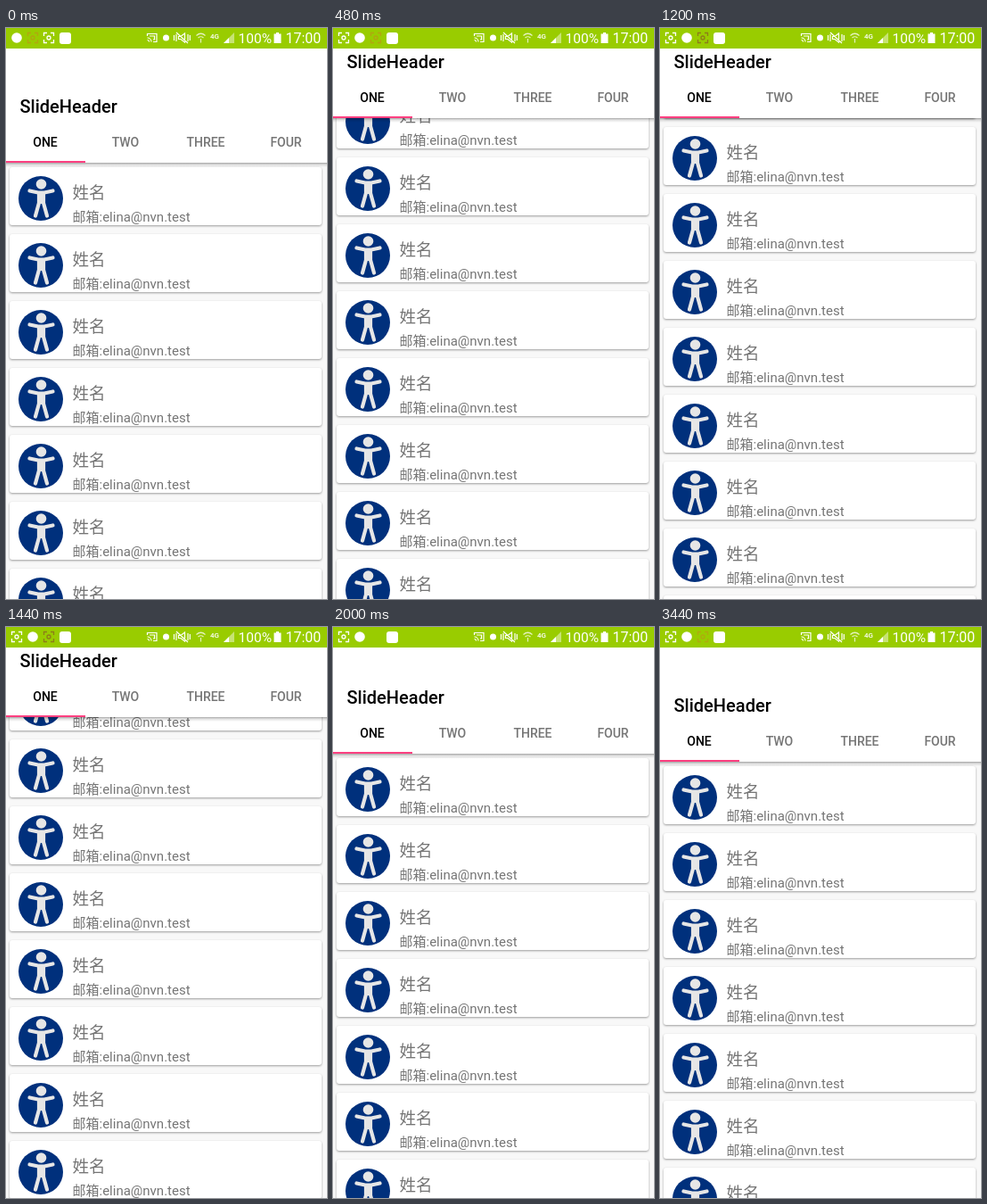
These frames come from a looping animation (360x640 px, 3.52 s). An HTML page:

```html
<!DOCTYPE html>
<html lang="zh-CN">
<head>
<meta charset="utf-8">
<title>Collapsing header</title>
<style>
  html, body { margin: 0; width: 100%; height: 100%; overflow: hidden; background: #f8f8f8; }
  svg { display: block; font-family: Roboto, "Noto Sans CJK SC", "Noto Sans CJK", sans-serif; }
  .card { filter: drop-shadow(0 1px 1px rgba(0, 0, 0, .38)); }
  .grey { fill: #757575; }
  .tabs { font-size: 14px; font-weight: 500; text-anchor: middle; }
  .line { fill: none; stroke: #fff; stroke-width: 1.2; }
  .limbs { fill: none; stroke: #e6e6e6; stroke-width: 4.2; stroke-linecap: round; stroke-linejoin: round; }
</style>
</head>
<body>
<svg width="360" height="640" viewBox="0 0 360 640">
  <defs>
    <linearGradient id="shade" x2="0" y2="1">
      <stop stop-color="#000" stop-opacity=".34"/>
      <stop offset=".4" stop-color="#000" stop-opacity=".12"/>
      <stop offset="1" stop-color="#000" stop-opacity="0"/>
    </linearGradient>
    <g id="card">
      <rect class="card" x="4" y="156" width="350" height="65" rx="3" fill="#fff"/>
      <circle cx="39" cy="191" r="25" fill="#00307c"/>
      <circle cx="39.500" cy="175" r="5.800" fill="#e6e6e6"/>
      <path class="limbs" d="M26.500 182.500 36 184.500H43L52.500 182.500M37 185V196L33 210.500M42 185V196L46 210.500M39.500 185V195"/>
      <g class="grey">
        <text x="74.5" y="190.5" font-size="18.5">姓名</text>
        <text x="74.5" y="217" font-size="15">邮箱:elina@nvn.test</text>
      </g>
    </g>
    <g id="capture" fill="none" stroke-width="1.3">
      <path d="M-5.5-2V-5.5H-2M2-5.5H5.5V-2M5.5 2V5.5H2M-2 5.5H-5.5V2"/>
      <circle r="2"/>
    </g>
  </defs>

  <rect width="360" height="640" fill="#f8f8f8"/>
  <g id="list"></g>

  <g id="header">
    <rect y="151" width="360" height="5" fill="url(#shade)"/>
    <rect y="-40" width="360" height="191" fill="#fff"/>
    <text x="15.5" y="94.5" font-size="20" font-weight="500">SlideHeader</text>
    <g class="tabs">
      <text x="44" y="133">ONE</text>
      <g class="grey">
        <text x="134" y="133">TWO</text>
        <text x="224" y="133">THREE</text>
        <text x="314" y="133">FOUR</text>
      </g>
    </g>
    <rect y="149" width="89" height="2" fill="#ff4081"/>
  </g>

  <rect width="360" height="23" fill="#99cc00"/>
  <use id="first" href="#capture" y="11" stroke="#fff"/>
  <circle id="dot" cy="11" r="5.8" fill="#fff"/>
  <use id="ghost" href="#capture" y="11"/>
  <rect x="60" y="5" width="13" height="13" rx="3" fill="#fff"/>

  <g class="line">
    <path d="M158.5 9V6.5H169V15.5H165M158.5 11A4.5 4.5 0 0 1 163 15.5M158.5 13.5A2 2 0 0 1 160.5 15.5M161 9H166.500V13H165"/>
    <path d="M188.5 8V14M191 7V15M204 7V15M206.3 8V14M193.5 9.5H196L200.5 6V16L196 12.5H193.5ZM191 5 204 17"/>
    <path d="M213.5 8.5Q218.5 4 223.5 8.5M215.5 11Q218.5 8.500 221.5 11M218.5 12V16.5" opacity=".75"/>
  </g>
  <circle cx="179.5" cy="11" r="3.5" fill="#fff"/>
  <g fill="#fff">
    <path d="M256 5V17H244Z" opacity=".45"/>
    <path d="M250 11V17H244Z"/>
    <path d="M303 5H306V6.5H308.5V17H300.5V6.5H303Z"/>
    <text x="229" y="11.5" font-size="8" font-weight="500">4G</text>
    <text x="260.5" y="17" font-size="15.500">100%</text>
    <text x="313.5" y="17" font-size="16">17:00</text>
  </g>
</svg>
<script>
const $ = id => document.getElementById(id);
const LOOP = 3520, STEP = 80, PITCH = 75, COLLAPSE = 50;

$('list').innerHTML = Array.from({ length: 9 }, (_, i) => `<use href="#card" y="${i * PITCH}"/>`).join('');

// Scroll distance: [time, position, velocity]
const keys = [
  [0, 0, 0], [480, 86, .02], [800, 87, .02], [1120, 120, 0],
  [1440, 105, -.16], [1760, 44, -.18], [2160, 0, 0]
];

function scrollAt(t) {
  const i = keys.findIndex(k => k[0] > t);
  if (i < 0) return 0;
  const [t0, p0, v0] = keys[i - 1], [t1, p1, v1] = keys[i];
  const d = t1 - t0, u = (t - t0) / d, w = 1 - u;
  return w * w * ((1 + 2 * u) * p0 + u * d * v0) + u * u * ((3 - 2 * u) * p1 - w * d * v1);
}

// Fading notification icon: [start, colour, opacity]
const ghostStates = [[0, '#e06030', .35], [720, '#d04020', .9], [1040, '#8a6a20', .8], [1680, '#fff', 0], [2320, '#e06030', .3]];

function draw(now) {
  const t = Math.floor(now % LOOP / STEP) * STEP;
  const y = Math.round(scrollAt(t));
  $('list').setAttribute('transform', `translate(0 ${-y})`);
  $('header').setAttribute('transform', `translate(0 ${-Math.min(y, COLLAPSE)})`);

  const swapped = t < STEP;
  const [, colour, opacity] = ghostStates.findLast(s => s[0] <= t);
  $('first').setAttribute('x', swapped ? 48 : 12);
  $('dot').setAttribute('cx', swapped ? 12 : 30);
  $('ghost').setAttribute('x', swapped ? 30 : 48);
  $('ghost').setAttribute('stroke', colour);
  $('ghost').setAttribute('opacity', opacity);
}

const start = performance.now();
function tick() {
  draw(performance.now() - start);
  requestAnimationFrame(tick);
}
tick();
</script>
</body>
</html>
```
